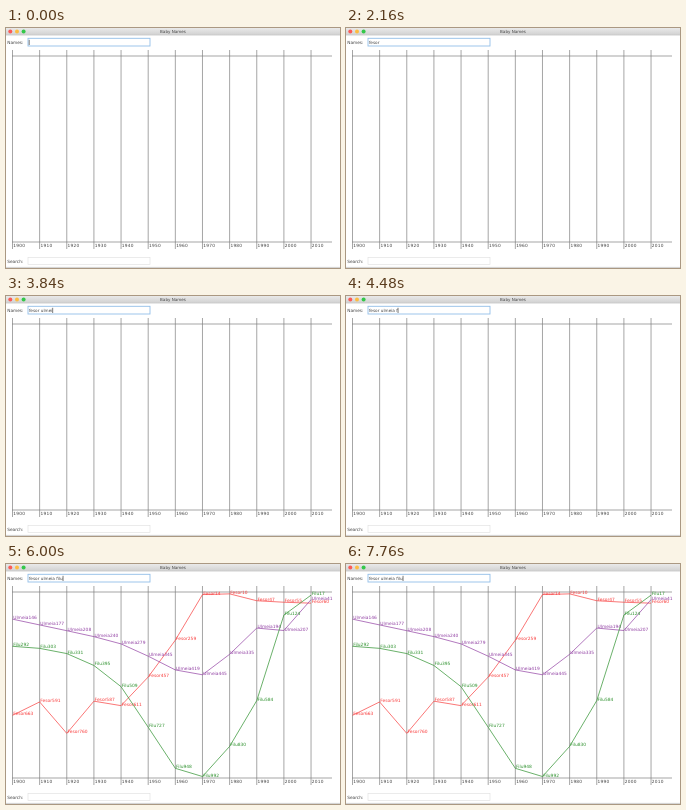
Recreate the animation shown at these times as an HTML page. Size 334x240 px, loop 7.92 s.

```html
<!DOCTYPE html>
<html lang="en">
<head>
<meta charset="utf-8">
<title>Baby Names</title>
<style>
  html, body { margin: 0; width: 100%; height: 100%; overflow: hidden; background: #fff; }
  svg { display: block; width: 334px; height: 240px; }
  text { font-family: "DejaVu Sans", Verdana, sans-serif; font-size: 4.3px; fill: #444; white-space: pre; }
  .grid { stroke: #808080; stroke-width: .7; fill: none; }
  .decade { letter-spacing: .25px; }
  .series polyline { fill: none; stroke-width: .7; stroke-linejoin: round; }
  .series text { font-size: 4.4px; }
</style>
</head>
<body>
<svg id="stage" viewBox="0 0 334 240">
  <defs>
    <linearGradient id="bar" x2="0" y2="1">
      <stop stop-color="#e9e9e9"/><stop offset="1" stop-color="#d1d1d1"/>
    </linearGradient>
  </defs>
  <rect width="334" height="240" fill="#fff"/>
  <rect width="334" height="7" fill="url(#bar)"/>
  <path d="M0 7.2H334" stroke="#b8b8b8" stroke-width=".5"/>
  <circle cx="4.3" cy="3.5" r="2" fill="#fc5b57"/>
  <circle cx="11" cy="3.5" r="2" fill="#fdbc40"/>
  <circle cx="17.6" cy="3.5" r="2" fill="#34c84a"/>
  <text x="167" y="5.2" text-anchor="middle" style="font-size:4.1px">Baby Names</text>
  <text x="1.2" y="15.7">Names:</text>
  <rect x="22" y="10.3" width="122" height="7.7" fill="#fff" stroke="#93bfe8" stroke-width=".9"/>
  <text id="entry" x="22.9" y="15.8" style="font-size:4.2px"></text>
  <path id="caret" d="M0 11.8V17" stroke="#222" stroke-width=".6"/>
  <text x="1.2" y="234.5">Search:</text>
  <rect x="22" y="229.3" width="122" height="7.2" fill="#fff" stroke="#dedede" stroke-width=".6"/>
  <path d="M0 239.4H334" stroke="#c4c4c4" stroke-width=".8"/>
</svg>
<script>
const LOOP = 7920, CHART_AT = 5600, DECADES = 12;
const stage = document.getElementById("stage");
const entry = document.getElementById("entry");
const caret = document.getElementById("caret");

function add(parent, tag, attrs, content = "") {
  const node = document.createElementNS("http://www.w3.org/2000/svg", tag);
  for (const key in attrs) node.setAttribute(key, attrs[key]);
  node.textContent = content;
  return parent.appendChild(node);
}

const decadeX = i => 6.5 + i * 27.14;
const rankY = rank => 28 + rank * 0.186;

// Smooth curve through a few { decade: rank } points
function rankAt(points, x) {
  const xs = Object.keys(points).map(Number);
  const last = xs.length - 1;
  const slope = i => {
    const a = xs[Math.max(0, i - 1)], b = xs[Math.min(last, i + 1)];
    return (points[b] - points[a]) / (b - a);
  };
  const i = Math.min(last - 1, xs.findLastIndex(k => k <= x));
  const span = xs[i + 1] - xs[i], t = (x - xs[i]) / span, u = 1 - t;
  return Math.round(
    u * u * ((1 + 2 * t) * points[xs[i]] + t * span * slope(i)) +
    t * t * ((1 + 2 * u) * points[xs[i + 1]] - u * span * slope(i + 1)));
}

// Grid and decade labels
let grid = "M6 28H326M6 214H326";
for (let i = 0; i < DECADES; i++) {
  grid += `M${decadeX(i)} 22V221`;
  add(stage, "text", { x: decadeX(i) + 0.8, y: 218.6, class: "decade" }, 1900 + i * 10);
}
add(stage, "path", { d: grid, class: "grid" });

// Popularity rank at the bends of each curve
const series = [
  ["Fesor", "#f83c3c", { 0: 663, 1: 591, 2: 760, 3: 587, 4: 611, 6: 259, 7: 14, 9: 47, 11: 60 }],
  ["Ulmeia", "#9140a3", { 0: 146, 4: 279, 7: 445, 9: 194, 10: 207, 11: 41 }],
  ["Filu", "#2c902c", { 0: 292, 2: 331, 4: 509, 6: 948, 7: 992, 9: 584, 10: 124, 11: 17 }]
];
const chart = add(stage, "g", { class: "series" });
for (const [name, color, points] of series) {
  const ranks = Array.from({ length: DECADES }, (_, i) => rankAt(points, i));
  const line = ranks.map((rank, i) => [decadeX(i), rankY(rank)]);
  add(chart, "polyline", { points: line.join(" "), stroke: color });
  line.forEach(([x, y], i) =>
    add(chart, "text", { x: x + 0.7, y, style: `fill:${color}` }, name + ranks[i]));
}

// Steady typing with one pause after the first word
const typed = "fesor ulmeia filu";
const keyTime = i => 1200 + i * 200 + (i < typed.indexOf(" ") ? 0 : 600);

// Fades out, rests, fades in, rests
function pulse(t) {
  const phase = (t % 1600 + 1600) % 1600;
  const fade = Math.min(1, phase % 800 / 480);
  return phase < 800 ? 1 - fade : fade;
}

function caretOpacity(t) {
  if (t < 2320) return t < 80 ? 1 : pulse(t - 80);
  return t < 5200 ? 1 : pulse(t - 6240);
}

function draw(now) {
  const t = now % LOOP;
  entry.textContent = [...typed].filter((_, i) => keyTime(i) <= t).join("");
  const width = entry.textContent ? entry.getComputedTextLength() : 0;
  caret.setAttribute("transform", `translate(${23.2 + width} 0)`);
  caret.setAttribute("opacity", caretOpacity(t));
  chart.setAttribute("visibility", t >= CHART_AT ? "visible" : "hidden");
}

const start = performance.now();
function tick() {
  draw(performance.now() - start);
  requestAnimationFrame(tick);
}
tick();
</script>
</body>
</html>
```
